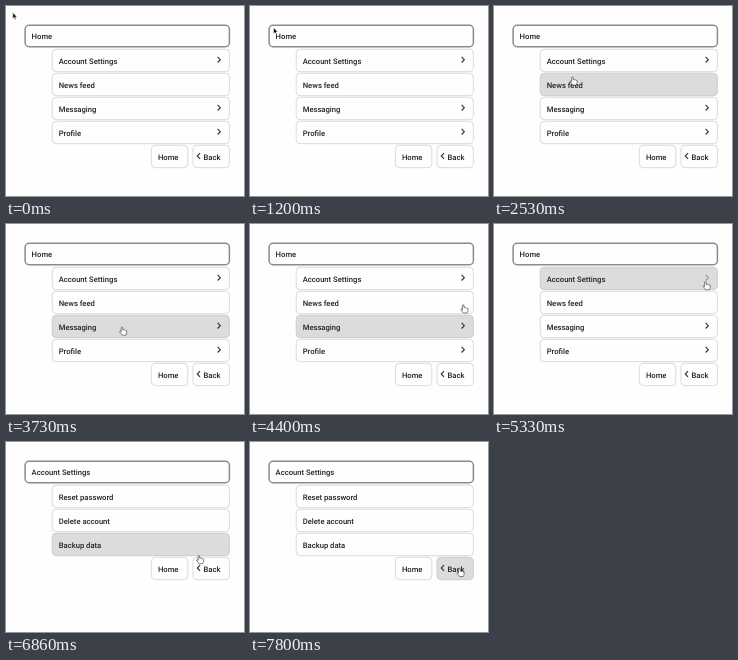
An HTML page for the animation above (8 s loop, 238 by 190 pixels).

```html
<!DOCTYPE html>
<html lang="en">
<head>
<meta charset="utf-8">
<title>Drilldown menu</title>
<style>
  html, body { margin: 0; width: 100%; height: 100%; overflow: hidden; background: #fefefe; }
  svg { display: block; width: 100%; height: 100%; }
  text { font: 500 7.65px Roboto, Arial, sans-serif; fill: #222; text-rendering: geometricPrecision; }
  .box { fill: #fefefe; stroke: #d6d6d6; stroke-width: .9; }
  .title { stroke: #8c8c8c; stroke-width: 1.5; }
  .hover { fill: #dcdcdc; stroke: #cbcbcb; }
  .chevron { fill: none; stroke: #333; stroke-width: 1.15; }
  .pressed .chevron { stroke: #c08a8e; }
  .ring { fill: none; stroke: #d88; }
  .arrow { fill: #111; stroke: #fff; stroke-width: .5; }
  .hand { fill: #fff; stroke: #444; stroke-width: .75; stroke-linejoin: round; }
</style>
</head>
<body>
<svg id="stage" viewBox="0 0 238 190"></svg>
<script>
const LOOP = 8000, STEP = 1000 / 15;
const ROW_LEFT = 46.2, ROW_TOP = 43.2, ROW_PITCH = 24, ROW_HEIGHT = 22.5, RIGHT = 223.4;
const HOVER_LAG = STEP, RING_TIME = 140, OPEN_DELAY = 130;
const CLICKS = [5600, 7660];
const stage = document.getElementById('stage');

function add(parent, tag, attrs, content = '') {
  const node = document.createElementNS('http://www.w3.org/2000/svg', tag);
  for (const key in attrs) node.setAttribute(key, attrs[key]);
  node.textContent = content;
  parent.append(node);
  return node;
}

function box(parent, x, y, width, label, kind = '') {
  const height = kind ? 21.4 : ROW_HEIGHT;
  const node = add(parent, 'g', {});
  const rect = add(node, 'rect', { x, y, width, height, rx: 4, class: 'box ' + kind });
  add(node, 'text', { x: x + 6.5, y: y + height / 2 + 3.2 }, label);
  return { node, rect, x, y, width, height };
}

function chevron(parent, x, y, dir) {
  add(parent, 'path', { d: `M${x} ${y}l${2.7 * dir} 2.8l${-2.7 * dir} 2.8`, class: 'chevron' });
}

// Builds one menu level; rows ending in ">" lead to a submenu.
function menu(title, rows) {
  const group = add(stage, 'g', {});
  box(group, 19.1, 19.3, RIGHT - 19.1, title, 'title');
  const targets = rows.map((row, i) => {
    const y = ROW_TOP + ROW_PITCH * i;
    const item = box(group, ROW_LEFT, y, RIGHT - ROW_LEFT, row.replace('>', ''));
    if (row.endsWith('>')) chevron(item.node, 211.6, y + 7.7, 1);
    return item;
  });
  const y = ROW_TOP + ROW_PITCH * rows.length;
  targets.push(box(group, 145.4, y, 36.4, 'Home'));
  const back = box(group, 187, y, 36.4, 'Back');
  back.node.querySelector('text').setAttribute('x', 197.5);
  chevron(back.node, 194, y + 8, -1);
  targets.push(back);
  return { group, targets };
}

const menus = [
  menu('Home', ['Account Settings>', 'News feed', 'Messaging>', 'Profile>']),
  menu('Account Settings', ['Reset password', 'Delete account', 'Backup data'])
];
const ring = add(stage, 'circle', { class: 'ring' });
const arrow = add(stage, 'path', {
  d: 'M0 0V6.2L1.5 4.9L2.5 7L3.5 6.5L2.5 4.5H4.3Z', class: 'arrow'
});
const hand = add(stage, 'path', {
  d: 'M-.9 .9Q0-.4 .8 .9V3.5Q1.7 2.8 2.3 3.8Q3.3 3.1 3.8 4.2Q5 3.7 5.2 5V7Q4.9 8.2 4.3 9.5H.2' +
     'Q-.7 8.1-2.5 6.1Q-3 4.9-1.9 5L-.9 5.9Z', class: 'hand'
});

// Pointer moves: [start, end, x, y]
const moves = [
  [533, 1200, 23.5, 21.5], [1200, 1400, 28.5, 37.5], [1400, 1800, 62, 55],
  [2267, 2500, 78.5, 70.5], [2933, 3467, 110, 101], [3667, 4133, 217, 130],
  [4133, 4533, 212, 63.5], [4533, 4733, 211.3, 54], [4933, 5333, 211.5, 57.2],
  [5600, 5930, 158.5, 98.5], [6600, 7067, 215, 122.5], [7200, 7400, 209.4, 126]
];

function pointerAt(t) {
  let x = 6.8, y = 6.5;
  for (const [start, end, toX, toY] of moves) {
    const u = Math.min(1, Math.max(0, (t - start) / (end - start)));
    const eased = u * u * (3 - 2 * u);
    x += (toX - x) * eased;
    y += (toY - y) * eased;
  }
  return { x, y };
}

const contains = (b, p) =>
  p.x > b.x && p.x < b.x + b.width && p.y > b.y && p.y < b.y + b.height;

function drawRing(t) {
  const click = CLICKS.find(c => t >= c && t < c + RING_TIME);
  ring.style.display = click ? '' : 'none';
  if (!click) return;
  const { x, y } = pointerAt(click), age = t - click;
  const attrs = { cx: x, cy: y, r: 8 + age / 8, opacity: .5 * (1 - age / 200) };
  for (const key in attrs) ring.setAttribute(key, attrs[key]);
}

function draw(time) {
  const t = Math.floor((time % LOOP + 7) / STEP) * STEP + 1;
  const tip = pointerAt(t), felt = pointerAt(t - HOVER_LAG);
  const level = t < CLICKS[0] + OPEN_DELAY ? 0 : 1;
  menus.forEach(({ group, targets }, i) => {
    group.style.display = i === level ? '' : 'none';
    for (const target of targets) {
      const hovered = contains(target, felt);
      target.rect.classList.toggle('hover', hovered);
      target.node.classList.toggle('pressed', hovered && Math.hypot(tip.x - 213, tip.y - 54) < 5);
    }
  });
  drawRing(t);
  const isArrow = tip.x < ROW_LEFT;
  arrow.style.display = isArrow ? '' : 'none';
  hand.style.display = isArrow ? 'none' : '';
  arrow.setAttribute('transform', `translate(${tip.x} ${tip.y})`);
  hand.setAttribute('transform', `translate(${tip.x} ${tip.y}) scale(.9)`);
}

const start = performance.now();
function tick() {
  draw(performance.now() - start);
  requestAnimationFrame(tick);
}
tick();
</script>
</body>
</html>
```
